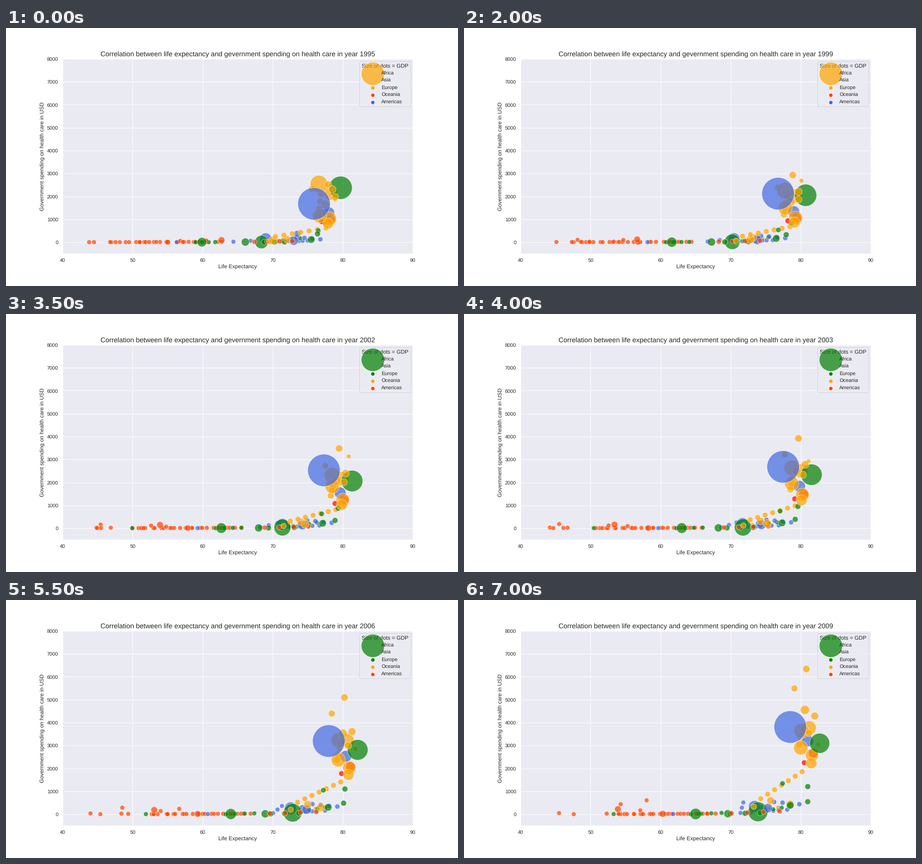
A matplotlib script for the animation above (7500 ms loop, 990 by 566 pixels).

```python
import numpy as np
import matplotlib.pyplot as plt
from matplotlib.animation import FuncAnimation

W, H, DPI = 990, 566, 72
YEARS = 15
INK, PANEL = "#262626", "#EAEAF2"
COLORS = dict(AF="orangered", AS="green", EU="orange", OC="red", AM="royalblue")

u = np.linspace(0, 1, YEARS)
EASE = u ** .88
# Shared exchange rate effect on spending counted in dollars.
RATES = np.interp(range(YEARS), [0, 2, 4, 5, 6, 7, 9, 11, 13, 14],
                  [1, .85, .8, .72, .71, .76, .93, .96, 1.06, 1])

rng = np.random.default_rng(7)
dots = []


def dot(region, r, x, y, swing=0, dip=0, since=0):
    """Add a dot going from x[0] to x[1] while spending compounds from y[0] to y[1]."""
    radius = np.interp(EASE, [0, 1], np.broadcast_to(r, 2))
    xs = x[0] + (x[1] - x[0]) * EASE - dip * np.sin(np.pi * u)
    ys = y[0] * (y[1] / y[0]) ** u * RATES ** swing
    ys[:since] = -9000
    dots.append((COLORS[region], xs, ys, (2 * radius + .8) ** 2))


def rich(region, r, x, y):
    dot(region, r, x, y, swing=1)


def chain(region, n, x0, x1, y0, y1, r=4.6, jitter=0., swing=0):
    """Add n dots spread evenly between the given ends, with optional noise."""
    spread = [np.linspace(*ends, n) for ends in (x0, x1, y0, y1)]
    for a, b, c, d in zip(*spread):
        noise = rng.normal(0, jitter, 2)
        dot(region, r, (a + noise[0], b + noise[1]), (c, d), swing)


# Low incomes
chain("AF", 24, (47, 62.4), (54, 67.8), (5, 20), (8, 30), jitter=.35)
chain("AF", 2, (43.8, 44.5), (55.2, 57.5), (5, 5), (10, 10))
dot("AF", 4.6, (51, 58), (8, 610))
dot("AF", (5.5, 6.8), (55, 60.3), (5, 20))
dot("AS", 4.6, (46, 53.3), (5, 10), since=7)
dot("AM", 4.6, (56.3, 61.8), (5, 10))
chain("AS", 4, (59, 61.8), (64.3, 68.7), (5, 10), (5, 60))
chain("AM", 3, (64.4, 69.3), (71.4, 71.8), (25, 100), (60, 515))

# Southern Africa loses years before it recovers
dot("AF", 4.6, (56.8, 54.3), (60, 440), dip=10)
dot("AF", 4.6, (57.2, 45.5), (15, 50), dip=6)
dot("AF", 4.6, (58, 52.3), (20, 30), dip=8)
dot("AF", 4.6, (53.4, 47.6), (15, 5), dip=5.3)
dot("AF", 4.6, (46.8, 54), (10, 20), dip=5.2)
dot("AF", 4.6, (60.5, 57.1), (80, 170), dip=6)
dot("AF", 6.7, (62.7, 53.9), (100, 225), dip=4)

# Middle incomes
chain("EU", 4, (69.8, 73.5), (73.8, 76.8), (50, 130), (200, 300), jitter=.2)
chain("AM", 7, (71, 75), (72, 78.2), (40, 70), (60, 200), jitter=.3)
chain("AS", 4, (70.3, 73.9), (74.8, 78.2), (40, 180), (150, 350), jitter=.2)
chain("AM", 4, (73.4, 76.8), (76.2, 79.8), (220, 130), (540, 440), r=5)
dot("AM", 6.8, (73.5, 74.4), (370, 270), swing=2)
rich("AM", 12.5, (69, 73.4), (150, 340))
dot("AS", (14, 21), (68.4, 73.9), (12, 110))
dot("AS", (9.7, 11.8), (59.9, 65), (5, 15))
dot("AS", 8.2, (66.1, 69.6), (10, 25))
chain("AS", 3, (68.8, 71.7), (69.9, 74.2), (10, 20), (25, 60), r=5.8)
dot("AM", 9.5, (73, 75.3), (70, 270))
chain("AF", 4, (67.4, 72.8), (70.1, 77), (20, 50), (45, 130), r=5)
dot("EU", 5.7, (69.5, 73.3), (30, 330))
dot("EU", 7.7, (72, 75.7), (130, 600))
dot("EU", 8.5, (70, 78.5), (80, 430))
chain("EU", 7, (70.4, 77.6), (74.3, 80.2), (250, 620), (680, 1860), r=5.6, swing=1)

# High incomes
rich("OC", 10, (78.25, 81.8), (1010, 2670))
chain("EU", 4, (76.9, 76.5), (80.4, 79.8), (2100, 1150), (3650, 3050), r=6.8, swing=1)
rich("AM", 12.2, (78, 81), (1290, 3200))
rich("EU", 6.8, (75.6, 79.1), (2340, 5495))
rich("EU", 15, (78.2, 81.2), (2150, 3770))
rich("EU", (18.5, 16), (76.6, 80.1), (2545, 3640))
dot("EU", 4.6, (78.9, 82.5), (1870, 3040), swing=-1)
dot("AS", 5.8, (77.4, 81), (880, 1210), swing=.6)
rich("EU", (15, 13.5), (78.1, 81.6), (1030, 2580))
rich("AS", (24.8, 21.4), (79.7, 82.7), (2380, 3100))
dot("AS", 5.2, (76.5, 77.4), (510, 1345), swing=1)
rich("EU", 9.4, (77.5, 80.6), (1650, 4555))
rich("OC", 5.6, (77, 80.5), (900, 2250))
dot("EU", 7.4, (77.9, 80.8), (2520, 6340), swing=.5)
dot("AS", 5.8, (76.4, 81), (370, 550), swing=1)
dot("AS", 7.5, (75.5, 78.5), (120, 390))
rich("EU", 11.5, (77.9, 81.5), (815, 2230))
rich("EU", 7.4, (78.9, 81.2), (1980, 3545))
rich("EU", 7.9, (78.5, 82), (2310, 4290))
dot("EU", 15, (76.7, 80), (1150, 2900))
dot("AM", 34.95, (75.9, 78.5), (1680, 3810))

fills = [d[0] for d in dots]
xs, ys, sizes = (np.array([d[i] for d in dots]) for i in (1, 2, 3))

# Chart
plt.rcParams.update({"font.family": "Liberation Sans", "text.hinting": "none",
                     "text.color": INK, "axes.labelcolor": INK})
fig = plt.figure(figsize=((W + .01) / DPI, (H + .01) / DPI), dpi=DPI, facecolor="white")
ax = fig.add_axes([.125, .125, .775, .755], facecolor=PANEL)
ax.set(xlim=(40, 90), ylim=(-500, 8000), xticks=range(40, 91, 10),
       yticks=range(0, 8001, 1000))
ax.set_axisbelow(True)
ax.grid(color="white", lw=1)
ax.tick_params(length=0, pad=9.5, labelsize=11, labelcolor=INK)
for spine in ax.spines.values():
    spine.set(color="white", lw=1.25)
ax.set_xlabel("Life Expectancy", size=12)
ax.set_ylabel("Government spending on health care in USD", size=12)
title = ax.set_title("", size=15)
cloud = ax.scatter(xs[:, 0], ys[:, 0], s=sizes[:, 0], c=fills, alpha=.7,
                   edgecolors="white", linewidths=.8)

blank = ax.scatter([], [], s=0, color="white")
keys = [ax.scatter([], [], s=36, color="gray", linewidths=1.5) for _ in range(3)]
legend = ax.legend([cloud, blank, *keys],
                   ["Africa", "Asia", "Europe", "Oceania", "Americas"],
                   title="Size of dots = GDP", title_fontsize=12, fontsize=11,
                   loc="upper right", facecolor=PANEL, edgecolor="0.8",
                   framealpha=.8, scatterpoints=1)
big, _, *small = legend.legend_handles


def update(i):
    title.set_text("Correlation between life expectancy and gevernment spending "
                   f"on health care in year {1995 + i}")
    cloud.set_offsets(np.column_stack((xs[:, i], ys[:, i])))
    cloud.set_sizes(sizes[:, i])
    order = ("EU", "AF", "AM") if i < 7 else ("AS", "EU", "AF")
    big.set_facecolor(COLORS[order[0]])
    for key, region in zip(small, order):
        key.set_color(COLORS[region])
    return cloud, title, big, *small


anim = FuncAnimation(fig, update, frames=YEARS, interval=500, repeat=True,
                     repeat_delay=0, blit=False)
plt.show()
```
